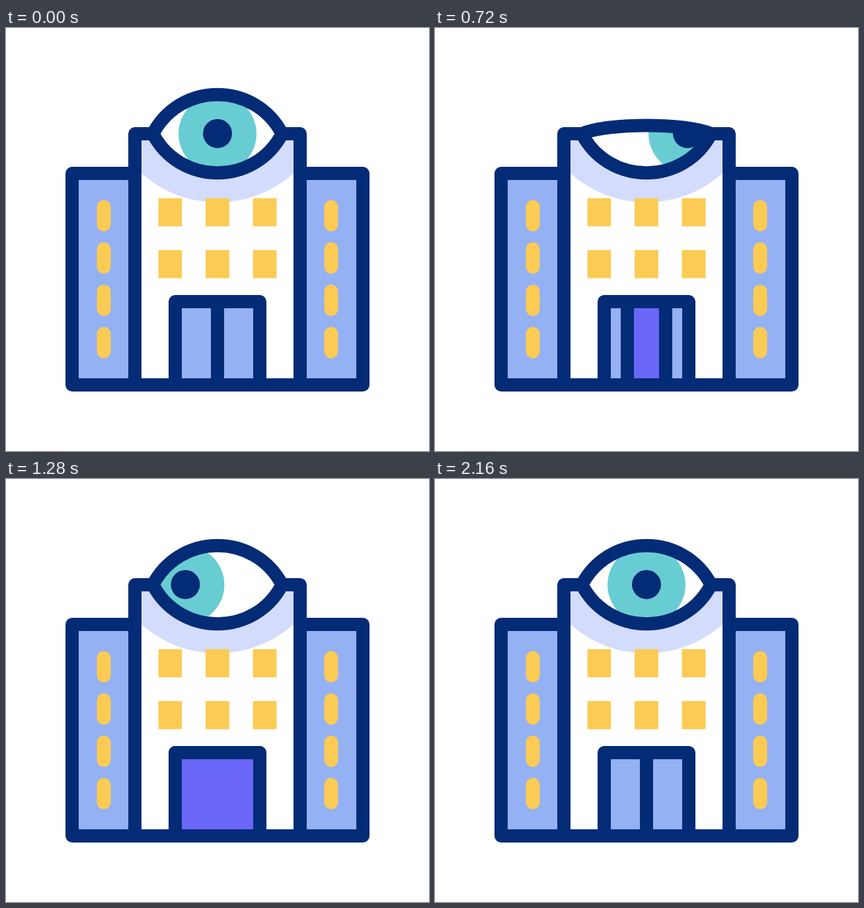
Animation of 640x640 px, one loop 2200 ms. Source, as an HTML page:

```html
<!DOCTYPE html>
<html>
<head>
<meta charset="utf-8">
<style>
  html, body { margin: 0; width: 100%; height: 100%; overflow: hidden; background: #fff; }
  svg { display: block; width: 100vw; height: 100vh; }
  .line { fill: none; stroke: #042b76; stroke-width: 20; stroke-linecap: round; stroke-linejoin: round; }
  .slot { stroke: #fccb53; stroke-width: 21; stroke-linecap: round; }
</style>
</head>
<body>
<svg viewBox="0 0 640 640">
  <defs><clipPath id="eyeClip"><path id="eyeShape"/></clipPath></defs>

  <path fill="#94b1f3" d="M100 220h95v320h-95zM445 220h95v320h-95z"/>
  <path fill="#d3dcfd" d="M195 160H222.3C263.3 239 376.7 239 417.7 160H445V210A172 172 0 0 1 195 210Z"/>
  <path fill="#fccb53" d="M230.7 257.5h35.5v42.5h-35.5zm71.3 0h35.8v42.5h-35.8zm71.6 0h35.8v42.5h-35.8zM230.7 336h35.5v42.5h-35.5zm71.3 0h35.8v42.5h-35.8zm71.6 0h35.8v42.5h-35.8z"/>
  <g id="slots"></g>

  <path fill="#6a67f8" d="M256 414h128v126H256z"/>
  <path id="panels" fill="#94b1f3"/>
  <path id="panelEdges" class="line"/>
  <path class="line" d="M256 540V414H384V540"/>

  <g clip-path="url(#eyeClip)">
    <path fill="#fff" d="M200 90h240v140H200z"/>
    <g id="iris">
      <circle cx="320" cy="160" r="59" fill="#68cdd2"/>
      <circle cx="320" cy="159.7" r="22" fill="#042b76"/>
    </g>
  </g>
  <path id="lid" class="line"/>
  <path class="line" d="M195 220H100V540H540V220H445"/>
  <path class="line" d="M195 540V160H222.3C263.3 239 376.7 239 417.7 160H445V540"/>
</svg>
<script>
const LOOP = 2200, STEP = 40;
const $ = id => document.getElementById(id);
const setPath = (id, d) => $(id).setAttribute('d', d);

for (const x of [148, 492])
  for (let i = 0; i < 4; i++)
    $('slots').innerHTML += `<path class="slot" d="M${x} ${270.7 + 64 * i}v26.6"/>`;

// Smooth 0..1 progress between two times
function ease(t, start, end) {
  const p = Math.min(1, Math.max(0, (t - start) / (end - start)));
  return p * p * (3 - 2 * p);
}

function draw(t) {
  // The gaze recentres while the eye is shut
  const gaze = t < 890
    ? 62 * ease(t, 200, 600)
    : -62 * (ease(t, 1000, 1400) - ease(t, 1600, 2000));
  $('iris').setAttribute('transform', `translate(${gaze} 0)`);

  const shut = ease(t, 600, 880) - ease(t, 900, 1190);
  const lidY = 160 - 79 * (1 - 2 * shut);
  const lid = `M222.3 160C263.3 ${lidY} 376.7 ${lidY} 417.7 160`;
  setPath('lid', lid);
  setPath('eyeShape', lid + 'C376.7 239 263.3 239 222.3 160Z');

  const gap = 64 * (ease(t, 535, 930) - ease(t, 1650, 2160));
  const left = 320 - gap, right = 320 + gap;
  setPath('panels', `M256 414H${left}V540H256zM384 414H${right}V540H384z`);
  setPath('panelEdges', `M${left} 414V540M${right} 414V540`);
}

function tick() {
  const t = performance.now() % LOOP;
  draw(Math.floor(t / STEP) * STEP);
  requestAnimationFrame(tick);
}
tick();
</script>
</body>
</html>
```
